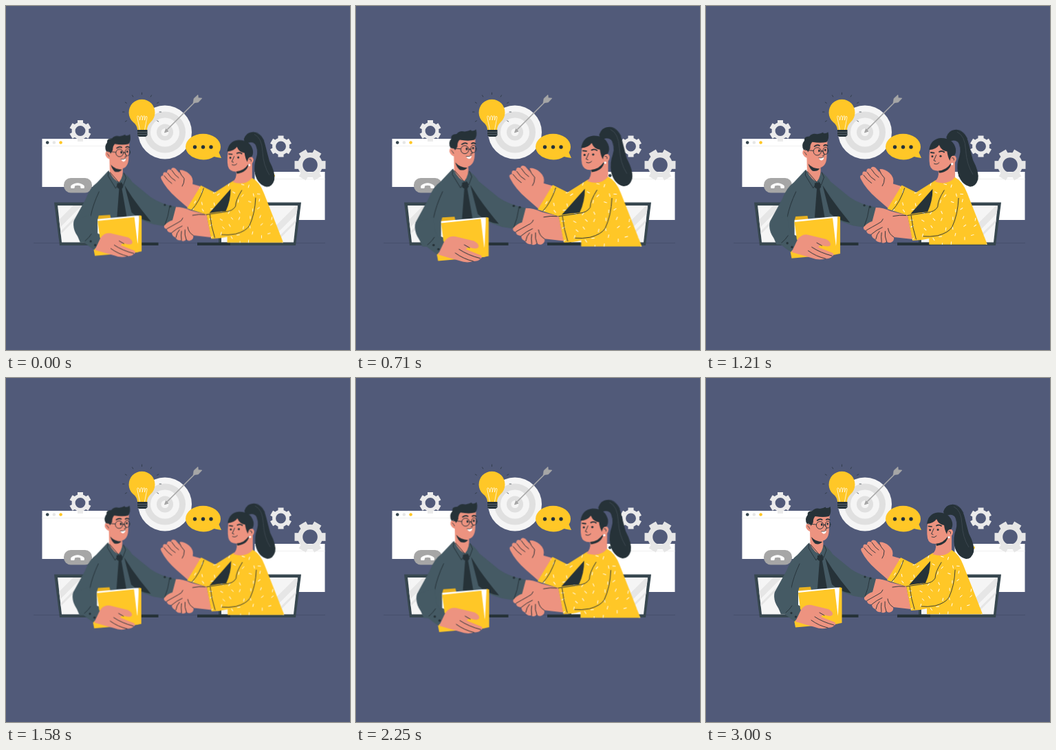
These frames come from a looping animation (500 by 500 pixels, 3.04 s). An HTML page:

```html
<!DOCTYPE html>
<html lang="en">
<head>
<meta charset="utf-8">
<title>Online agreement</title>
<style>
  html, body { margin: 0; width: 100%; height: 100%; overflow: hidden; background: #515a79; }
  svg { display: block; width: 100vw; height: 100vh; }
  #people { transform-origin: 250.5px 272.5px; }
  .dark { fill: #263238; }
  .frame { fill: #37474f; }
  .suit { fill: #455a64; }
  .skin { fill: #ed9380; }
  .gold { fill: #ffc727; }
  .white { fill: #fff; }
  .line { fill: none; stroke: #263238; stroke-width: .9; stroke-linecap: round; stroke-linejoin: round; }
  .thin { stroke-width: .7; }
  .brow { stroke-width: 1.7; }
</style>
</head>
<body>
<svg viewBox="0 0 500 500">
  <defs>
    <clipPath id="cloth">
      <path d="M330 254L357 250Q368 256 374 272L402 343.300H321V337L298 338L291 303L263 294L283 261L303 271Z"/>
    </clipPath>
    <clipPath id="screenL"><path d="M75 290H186V343.500H81Z"/></clipPath>
    <clipPath id="screenR"><path d="M424 290H313V343.500H418Z"/></clipPath>
  </defs>

  <path d="M40 344.500H464" stroke="#454d69" stroke-width=".8"/>

  <!-- windows -->
  <g id="windows"></g>
  <rect x="84" y="250" width="41" height="21.500" rx="10" fill="#a6a6a6"/>
  <path class="white" d="M94.500 261Q104 253.500 113.500 261Q114.500 263 113.500 265H109Q108 264 108.200 261.500Q104 260 100 261.500Q100 264 99 265H94.500Q93.500 263 94.500 261Z"/>
  <g id="gears"></g>

  <!-- target and arrow -->
  <g id="rings"></g>
  <g stroke="#a6a6a6" stroke-width="1.600" fill="#a6a6a6">
    <path d="M232 182L276 138"/>
    <path d="M230.500 184L232.500 178.500L236 182Z" stroke-width="1"/>
    <path d="M272 141L273 134.500L279 129L279.500 133.500L285 134L279.500 140Z" stroke-width=".5"/>
  </g>

  <!-- bulb -->
  <path class="gold" d="M191 180Q190.500 173 184.500 168.500A19 19 0 1 1 210.500 168.500Q205.500 173 205 180Z"/>
  <path fill="none" stroke="#fff" stroke-width=".7" d="M194.500 180L191 163Q190 159 192.500 160Q195 162 194.500 166Q196 157 197.800 160Q199 163 198 166Q200 157 201.500 160Q202 163 201.500 166Q203 158 205 161Q205 164 204 167L201.500 180"/>
  <path class="dark" d="M191 180H205.500V188L203 190H193.500L191 188Z"/>
  <path d="M191 183.400H205.500M191 186.700H205.500" stroke="#68717c" stroke-width=".8"/>
  <g id="rays"></g>

  <!-- speech bubble -->
  <path class="gold" d="M261 205A25.500 19.300 0 0 1 312 205Q312 209 309.500 213L313 221Q306 220 302.500 219A25.500 19.300 0 0 1 261 205Z"/>
  <g class="dark"><circle cx="274.500" cy="205" r="2.700"/><circle cx="286.500" cy="205" r="2.700"/><circle cx="298" cy="205" r="2.700"/></g>

  <!-- laptops -->
  <path class="frame" d="M70 285.500H190V348H78Z"/>
  <path fill="#f5f5f5" d="M75 290H186V343.500H81Z"/>
  <g clip-path="url(#screenL)" stroke="#e6e6e6"><path d="M72 322L106 288" stroke-width="9"/><path d="M76 333L122 287" stroke-width="3"/></g>
  <path class="frame" d="M429 285.500H309V348H421Z"/>
  <path fill="#f5f5f5" d="M424 290H313V343.500H418Z"/>
  <g clip-path="url(#screenR)" stroke="#e6e6e6"><path d="M388 330L430 288" stroke-width="9"/><path d="M396 338L434 300" stroke-width="3"/></g>
  <path class="dark" d="M148 343.700H221.500V348H148ZM278 343.700H326V348H278Z"/>
  <path class="frame" d="M78 344H148V348H78ZM326 344H421V348H326Z"/>

  <g id="people">
    <!-- man: torso -->
    <path class="suit" d="M149 240L133 257Q123 264 117 280L100 311Q98 322 105 334L109 343.500H190L190 308Q200 312 215 317L240 321L247 292Q224 287 211 278L184 256Q180 249 172 243L160 248Z"/>
    <path class="dark" d="M173 261L184 278Q196 295 211 313Q195 311 183 300Z"/>
    <path class="skin" d="M151 221L151.500 242Q158 254 165 256Q172 248 170 234Z"/>
    <path class="dark" d="M153 231Q159 238 169 238Q165.500 242.500 159 241Q155 238 153 231Z"/>
    <path class="dark" d="M162 258L169 257L171 263L169 266L176 306H162L165 266L162 264Z"/>
    <path class="line" d="M150 240L149 247L160 265L165 257L152 242M172 243L175 250L171 261L167 256M136 270Q127 289 124 305M238 291Q236 306 231 318"/>
    <g class="dark"><circle cx="231" cy="289" r="1.600"/><circle cx="239" cy="291" r="1.600"/></g>

    <!-- man: head -->
    <g transform="translate(-1.300 0)">
      <path class="skin" d="M152 204L153 213Q146 209 146.500 217Q149 223 154 223Q157 237 169 237Q179 236 180 223L181 200L166 196Z"/>
      <path class="dark" d="M148 212Q144 205 149 199Q148 193 156 193Q160 188 167 190Q172 189 175 187.500Q175 189 177 189Q180 189 182 187Q184 196 180 201Q172 203 160 201Q157 204 157 210L154 215Q152 210 148 212Z"/>
      <path class="line brow" d="M163 207Q167 204 170 206M176 206Q178 204 181 206"/>
      <g class="dark"><ellipse cx="169.500" cy="213" rx="1.300" ry="1.900"/><ellipse cx="178" cy="212" rx="1.200" ry="1.800"/></g>
      <g class="line"><circle cx="167" cy="214" r="5.400"/><ellipse cx="178.500" cy="213" rx="3.600" ry="5"/><path d="M150 212L161.500 213M172.300 213.500H175M174 213Q176 217 177 219L174.500 220"/></g>
      <path class="white" d="M169 223Q173 224 176 221.500Q176 226.500 172 226.500Q169.500 225.500 169 223Z"/>
      <path class="line thin" d="M169 223Q173 224 176 221.500M149 215Q151 216 152 219"/>
    </g>

    <!-- folder and near sleeve -->
    <path fill="#e8b120" d="M134 310L135.500 304.500L152 303.500L153 308V320H134Z"/>
    <path class="white" d="M134 309.500L190 304.500L194 304.500L196 349L184 354L134 330Z"/>
    <path class="gold" d="M134 312L187 306.500L193 357L130 362.500L128 352L139 350Z"/>
    <path class="gold" d="M194 304L197.500 305V356L187 358L192 343Z"/>
    <path class="suit" d="M100 311Q97 323 105 334Q113 343 129 354L139 338Q130 331 126 323L124 303Z"/>
    <path class="line" d="M116 341Q122 336 125 331"/>
    <g class="dark"><circle cx="124" cy="341.500" r="1.600"/><circle cx="130.500" cy="347" r="1.600"/></g>
    <path class="skin" d="M138 337Q144 328 153 330L178 336Q185 340 184 344Q182 348 171 344L167 347L187 355Q190 358 186 360Q184 363 177 363Q168 366 158 362Q143 358 130 354Z"/>
    <path class="line" d="M165 341L172 345M158 347Q170 355 186 359M153 352Q164 360 177 363"/>

    <!-- woman: ponytail and raised hand -->
    <path class="dark" d="M345 194Q349 183 359 184Q372 186 376 203Q379 215 382 226Q391 243 389 253Q386 263 378 263Q365 260 361 244Q359 231 363 221Q367 208 361 201Q355 196 347 202Z"/>
    <path class="line thin" d="M352 186Q366 179 374 196M363 204Q367 215 363 228"/>
    <path d="M360 187Q371 192 372 212T382 246" fill="none" stroke="#4a555e" stroke-width=".6"/>
    <path class="skin" d="M264 293L248 279Q233 266 226 252Q223.500 247 228.500 246.500Q227.500 240 234 242.500Q234 236 240 238.500Q241 233.500 246.500 236.500L256 247.500Q249.500 241 253 238.500Q260 238.500 266 244Q273 250 271 259L285 263Z"/>
    <path class="line" d="M230 247Q235 254 241 258M235 243Q240 251 246 254M241 239Q246 247 251 250M252 240Q254 246 259 251Q259 258 256 262"/>

    <!-- handshake -->
    <path class="skin" d="M247 292Q257 292 268 297L291 303L298 336L272 333Q273 338 269 340Q265 342 262 339Q258 343 254 340Q249 341 246 336Q241 334 241 329Q234 329 234 324Q229 323 230 319Q235 313 242 311Z"/>
    <path class="line" d="M234 323.500Q242 319 250 314.500Q256 312 257 308M241 329Q248 323 256 319.500M247 336Q248 329 252 325M255 340Q254 332 255 327M262 339.500Q259 332 260 325M272 333Q265 329 264 321M271 304Q280 302 289 303"/>

    <!-- woman: clothes -->
    <path class="gold" d="M283 261L303 271L330 254L357 250Q368 256 374 272L402 343.300H321V335Q310 338 298 338L291 303L263 294Z"/>
    <g id="dashes" clip-path="url(#cloth)"></g>
    <path class="dark" d="M295 301L326 266Q326 283 319 298Q306 299 295 301Z"/>
    <path class="line" d="M287 265Q281 284 270 296M362 279Q361 302 353 319Q348 327 333 331Q322 333 313 332M342 268Q333 282 333 291Q329 298 318 299L291 303M296 303Q298 321 303 336"/>

    <!-- woman: head -->
    <path class="skin" d="M334 234L357 224V250Q347 262 329 256Q335 250 334 242Z"/>
    <path class="dark" d="M334 240Q345 238 352 230Q350 242 335 244Z"/>
    <path class="skin" d="M323 206Q320 222 322 233Q324 241 333 241Q346 240 351 230Q358 232 359 224Q358 218 352 220L350 204Z"/>
    <path class="dark" d="M321 212Q323 197 337 195.500Q354 195 358 210Q359 216 356 220Q351 219 350 227Q347 222 346 214Q338 213 335 205Q331 211 321 212Z"/>
    <path class="line brow" d="M323.500 215.500L328 216M335 214.500Q339 212.500 342 215"/>
    <g class="dark"><circle cx="325.500" cy="221" r="1.400"/><circle cx="337" cy="220.500" r="1.500"/></g>
    <path class="line" d="M331 219Q329 224 327.500 226.500L330 227.500M328 231Q332 233 335 229.500M353 223Q356 222 355.500 226"/>
    <circle class="white" cx="353" cy="231.500" r="1.600"/>
  </g>
</svg>
<script>
  const $ = id => document.getElementById(id);
  const fill = (id, parts) => { $(id).innerHTML = parts.join(""); };

  const disc = (x, y, r, color) => `<circle cx="${x}" cy="${y}" r="${r}" fill="${color}"/>`;

  function browser(x, y) {
    const dots = ["#37474f", "#e6e6e6", "#ffc727"].map((c, i) => disc(x + 7.7 + i * 9.7, y + 5.5, 2.3, c));
    return `<rect class="white" x="${x}" y="${y}" width="102" height="70"/>
      <path d="M${x} ${y + 10.5}h102" stroke="#ededed" stroke-width=".8"/>` + dots.join("");
  }

  function gear(x, y, r, color, turn) {
    let teeth = "";
    for (let i = 0; i < 6; i++) {
      teeth += `<path d="M0 ${-r * .7}V${-r}" stroke-width="${r * .52}" transform="rotate(${i * 60 + turn})"/>`;
    }
    return `<g transform="translate(${x} ${y})" fill="none" stroke="${color}">
      <circle r="${r * .64}" stroke-width="${r * .32}"/>${teeth}</g>`;
  }

  // Short spokes around the bulb, open towards its base
  function spoke(_, i) {
    const a = (i * 30 - 210) * Math.PI / 180;
    const at = r => `${197.5 + Math.cos(a) * r} ${154 + Math.sin(a) * r}`;
    return `<path class="line thin" d="M${at(25.5)}L${at(28)}"/>`;
  }

  function confetti() {
    let seed = 11;
    const rnd = () => (seed = seed * 16807 % 2147483647) / 2147483647;
    const out = [];
    for (let y = 257; y < 344; y += 12) {
      for (let x = 266; x < 404; x += 14) {
        const px = x + rnd() * 9, py = y + rnd() * 7, turn = rnd() * 180;
        out.push(`<path d="M-2.2 0H2.2" transform="translate(${px} ${py}) rotate(${turn})" stroke="#fff" stroke-width=".9"/>`);
      }
    }
    return out;
  }

  fill("windows", [browser(52.5, 193), browser(361.5, 241)]);
  fill("gears", [gear(108, 181.5, 15.5, "#ebebeb", 0), gear(399.5, 204, 15.5, "#ebebeb", 0), gear(442, 231, 22.5, "#e6e6e6", 30)]);
  fill("rings", [39, 30, 21, 12, 5.5].map((r, i) => disc(231, 183.5, r, i % 2 ? "#e0e0e0" : "#f5f5f5")));
  fill("rays", Array.from({ length: 9 }, spoke));
  fill("dashes", confetti());

  // Pulse: time in ms, growth from 0 to 1
  const LOOP = 3040;
  const pulse = [
    [0, .07], [600, 1], [710, .89], [1210, .46], [1580, .16], [1740, 0],
    [2170, .57], [2250, .75], [2390, 1], [2710, .46], [3000, 0], [LOOP, .07]
  ];
  $("people").animate(
    pulse.map(([t, v]) => ({ offset: t / LOOP, transform: `scale(${1 + v * .1})` })),
    { duration: LOOP, iterations: Infinity }
  );
</script>
</body>
</html>
```
